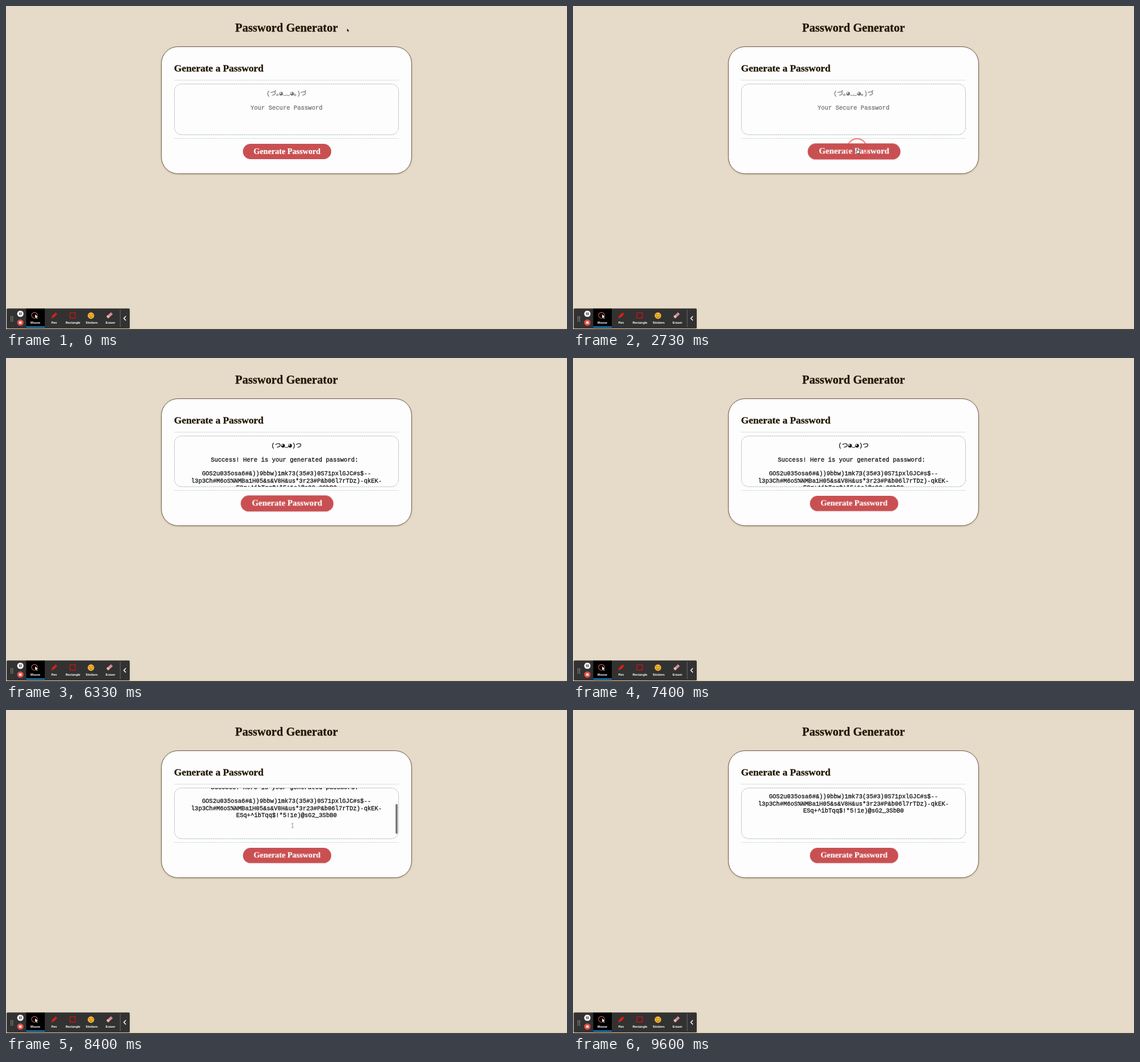
Write an HTML page that moves like this. It is 984 px wide and 569 px high and loops after 9660 ms.

```html
<!DOCTYPE html>
<html lang="en">
<head>
<meta charset="utf-8">
<title>Password Generator</title>
<style>
  html, body { margin: 0; width: 100%; height: 100%; overflow: hidden; background: #e5dbc8; }
  svg { display: block; width: 984px; height: 569px; cursor: default; user-select: none; }

  .head { font-family: "Liberation Serif", "Times New Roman", serif; font-weight: 700; fill: #231603; stroke: #231603; stroke-width: .3; }
  .light { fill: #fff; stroke: #fff; stroke-width: .2; }
  .mono { font: 400 10.53px "Liberation Mono", "Noto Sans CJK JP", monospace; white-space: pre; stroke: currentColor; stroke-width: .3; }
  .mid { text-anchor: middle; }
  .end { text-anchor: end; }
  .hint { fill: #757575; color: #757575; }
  .result { fill: #111; color: #111; }
  .label { font: 700 5.4px "Liberation Sans", Arial, sans-serif; fill: #fff; text-anchor: middle; }
  .rule { stroke: #d9dfdf; }

  .anim { animation: 9660ms linear infinite; }
  .step { animation-timing-function: step-end; }
  .button { animation-name: hover; transform-origin: 493px 255.5px; }
  .hint { animation-name: hint; }
  .result { animation-name: result; }
  .scroll { animation-name: scroll; }
  .thumb { animation-name: thumb; }
  .bar { animation-name: bar; }
  .ring { animation-name: ring; }
  .pointer { animation-name: pointer; }
  .arrow { animation-name: arrow; }
  .hand { animation-name: hand; }
  .ibeam { animation-name: ibeam; }

  @keyframes hover {
    0%, 21.3% { transform: scale(1); animation-timing-function: ease; }
    23.4%, 69.8% { transform: scale(1.05); animation-timing-function: ease; }
    72.7%, 100% { transform: scale(1); }
  }
  @keyframes hint { 0% { opacity: 1; } 62.11%, 100% { opacity: 0; } }
  @keyframes result { 0% { opacity: 0; } 62.11%, 100% { opacity: 1; } }
  @keyframes scroll {
    0%, 80.75% { transform: translateY(0); }
    84.16% { transform: translateY(-25px); }
    86.96% { transform: translateY(-43px); animation-timing-function: ease-out; }
    90.06%, 100% { transform: translateY(-51px); }
  }
  @keyframes thumb {
    0%, 80.75% { transform: translateY(0); }
    84.16% { transform: translateY(16.3px); }
    86.96% { transform: translateY(28px); animation-timing-function: ease-out; }
    90.06%, 100% { transform: translateY(33.2px); }
  }
  @keyframes bar {
    0%, 80.75% { opacity: 0; }
    81.3%, 95.24% { opacity: 1; }
    98%, 100% { opacity: 0; }
  }
  @keyframes ring {
    0%, 26.91% { opacity: 0; }
    26.92%, 28.7% { opacity: 1; }
    31.06%, 100% { opacity: 0; }
  }
  @keyframes pointer {
    0%, 13.04% { transform: translate(598px, 39px); animation-timing-function: ease-in-out; }
    23.4%, 67.3% { transform: translate(499.5px, 255px); animation-timing-function: ease-in-out; }
    74.5%, 100% { transform: translate(502.5px, 203px); }
  }
  @keyframes arrow { 0% { opacity: 1; } 21.4%, 100% { opacity: 0; } }
  @keyframes hand {
    0% { opacity: 0; } 21.4% { opacity: 1; } 36.54% { opacity: 0; }
    67.3% { opacity: 1; } 71.1%, 100% { opacity: 0; }
  }
  @keyframes ibeam { 0% { opacity: 0; } 71.1% { opacity: 1; } 98.3%, 100% { opacity: 0; } }
</style>
</head>
<body>
<svg viewBox="0 0 984 569">
  <defs>
    <clipPath id="field"><rect x="296" y="137" width="392" height="89" rx="12"/></clipPath>
    <filter id="soft" x="-10%" y="-20%" width="120%" height="140%">
      <feDropShadow dx="0" dy="1" stdDeviation="1.8" flood-color="#5a4526" flood-opacity=".22"/>
    </filter>
    <g id="eye">
      <circle r="3" fill="none" stroke="currentColor" stroke-width=".8"/>
      <path d="M0 0V-3A3 3 0 1 1 -3 0Z" fill="currentColor"/>
    </g>
    <path id="smile" d="M-2.9 2.2Q0 5 2.9 2.2" fill="none" stroke="currentColor"/>
    <path id="tip" d="M0 0V6.6L1.6 5.2L2.7 7.6L3.8 7.1L2.7 4.8H4.7Z"/>
  </defs>

  <rect width="984" height="569" fill="#e5dbc8"/>
  <text class="head mid" x="492" y="45" font-size="20.45">Password Generator</text>

  <rect x="272.6" y="71.5" width="438.8" height="223" rx="29" fill="#fdfdfd" stroke="#54412c" stroke-width=".85" filter="url(#soft)"/>
  <text class="head" x="294.7" y="114.5" font-size="17.35">Generate a Password</text>
  <path class="rule" d="M295 130.2H689M295 232.7H689"/>
  <rect x="295.5" y="137" width="393" height="89" rx="12.5" fill="none" stroke="#a3afaf" stroke-dasharray="2.2 1.2"/>

  <g clip-path="url(#field)">
    <g class="hint anim step">
      <text class="mono end" x="479.2" y="157.3">(づ｡</text>
      <use href="#eye" x="482.5" y="154"/>
      <use href="#smile" x="489.2" y="154"/><use href="#smile" x="495" y="154"/>
      <use href="#eye" x="501.7" y="154"/>
      <text class="mono" x="505" y="157.3">｡)づ</text>
      <text class="mono mid" x="492" y="182.3">Your Secure Password</text>
    </g>
    <g class="result anim step">
      <g class="scroll anim">
        <text class="mono end" x="482.2" y="157.3">(つ</text>
        <use href="#eye" x="485.8" y="154"/>
        <use href="#smile" x="492" y="154"/>
        <use href="#eye" x="498.2" y="154"/>
        <text class="mono" x="501.8" y="157.3">)つ</text>
        <g class="mono mid">
          <text x="488.5" y="182.3">Success! Here is your generated password:</text>
          <text x="492" y="206.4">GOS2u035osa6#&amp;))9bbw)1mk73(35#3)0S71pxlGJC#s$--</text>
          <text x="492" y="218.5">l3p3Ch#M6oS%NMBa1H05&amp;s&amp;V8H&amp;us*3r23#P&amp;b06l7rTDz)-qkEK-</text>
          <text x="492" y="230.6">ESq+^ibTqq$!*5!1e)@sG2_3SbB0</text>
        </g>
      </g>
    </g>
  </g>
  <g class="bar anim">
    <rect class="thumb anim" x="683.3" y="137" width="3.6" height="52.6" rx="1.8" fill="#777"/>
  </g>

  <g class="button anim">
    <rect x="415.5" y="242" width="155" height="27" rx="13.5" fill="#c95052"/>
    <text class="head mid light" x="493" y="259.6" font-size="14.15">Generate Password</text>
  </g>

  <!-- Recorder toolbar -->
  <rect y="567.6" width="984" height="1.4" fill="#17140f"/>
  <rect x="1.2" y="531.3" width="215.8" height="35" rx="1.5" fill="#323232" filter="url(#soft)"/>
  <rect x="35.5" y="531.5" width="32.5" height="34" fill="#000"/>
  <rect x="35.5" y="562.8" width="32.5" height="2" fill="#2196e3"/>
  <path d="M8.7 545V554M11.7 545V554" stroke="#bbb" stroke-width="1.3" stroke-dasharray="1.3 1.3"/>
  <circle cx="25.2" cy="540.5" r="5.6" fill="#f2f2f2"/>
  <path d="M23.9 538.2V542.8M26.5 538.2V542.8" stroke="#333" stroke-width="1.3"/>
  <circle cx="25.2" cy="556" r="5.6" fill="#e2504c"/>
  <rect x="23.2" y="554" width="4" height="4" fill="#fff"/>

  <circle cx="50" cy="543.3" r="5.2" fill="none" stroke="#cf5d54" stroke-width="1.1"/>
  <use href="#tip" transform="translate(51 541) scale(1.15)" fill="#fff" stroke="#000" stroke-width=".4"/>
  <g transform="translate(84.5 543.5) rotate(45)">
    <path d="M-2-5.5H2V3L0 7L-2 3Z" fill="#e3221c"/>
    <path d="M-2-3H2M-2 2.5H2" stroke="#8f1511" stroke-width=".8"/>
  </g>
  <rect x="112.2" y="538.7" width="9.4" height="9.4" fill="none" stroke="#d01010" stroke-width="1.4"/>
  <circle cx="149" cy="543.7" r="5.7" fill="#f5b62f"/>
  <path d="M145.5 542.5q1.2-1.5 2.4 0M150.1 542.5q1.2-1.5 2.4 0M146.3 545.3q2.7 2.8 5.4 0" fill="none" stroke="#7b3d16" stroke-width=".9"/>
  <g transform="translate(181.7 543.2) rotate(-42)">
    <rect x="-5.5" y="-2.4" width="11" height="4.8" rx="1" fill="#d58d93"/>
    <rect x="-5.5" y="-2.4" width="3.5" height="4.8" rx="1" fill="#e6b9ba"/>
  </g>
  <text class="label" x="51.6" y="557.8">Mouse</text>
  <text class="label" x="84.4" y="557.8">Pen</text>
  <text class="label" x="117.3" y="557.8">Rectangle</text>
  <text class="label" x="150.3" y="557.8">Stickers</text>
  <text class="label" x="183.2" y="557.8">Eraser</text>
  <path d="M200.3 533.5V564" stroke="#777" stroke-width=".8"/>
  <path d="M210.3 544.8L206.7 548.5L210.3 552.2" fill="none" stroke="#fff" stroke-width="1.5"/>

  <!-- Click ring and pointer -->
  <circle class="ring anim" cx="498.3" cy="250.5" r="17.3" fill="none" stroke="#e84040" stroke-opacity=".62" stroke-width="2.2"/>
  <g class="pointer anim">
    <use class="arrow anim step" href="#tip" fill="#111" stroke="#fff" stroke-width=".5"/>
    <path class="hand anim step" d="M-1.5-4.2Q-.6-5 .1-4V-1.4L2.4-.9Q3.4-.6 3.2.6L2.5 4H-1.4L-3.4 1Q-3.3-.1-1.5.8Z" fill="#fff" stroke="#222" stroke-width=".8"/>
    <path class="ibeam anim step" d="M-1.5-4Q0-4 0-3V3Q0 4-1.5 4M1.5-4Q0-4 0-3M0 3Q0 4 1.5 4" fill="none" stroke="#666" stroke-width=".8"/>
  </g>
</svg>
</body>
</html>
```
